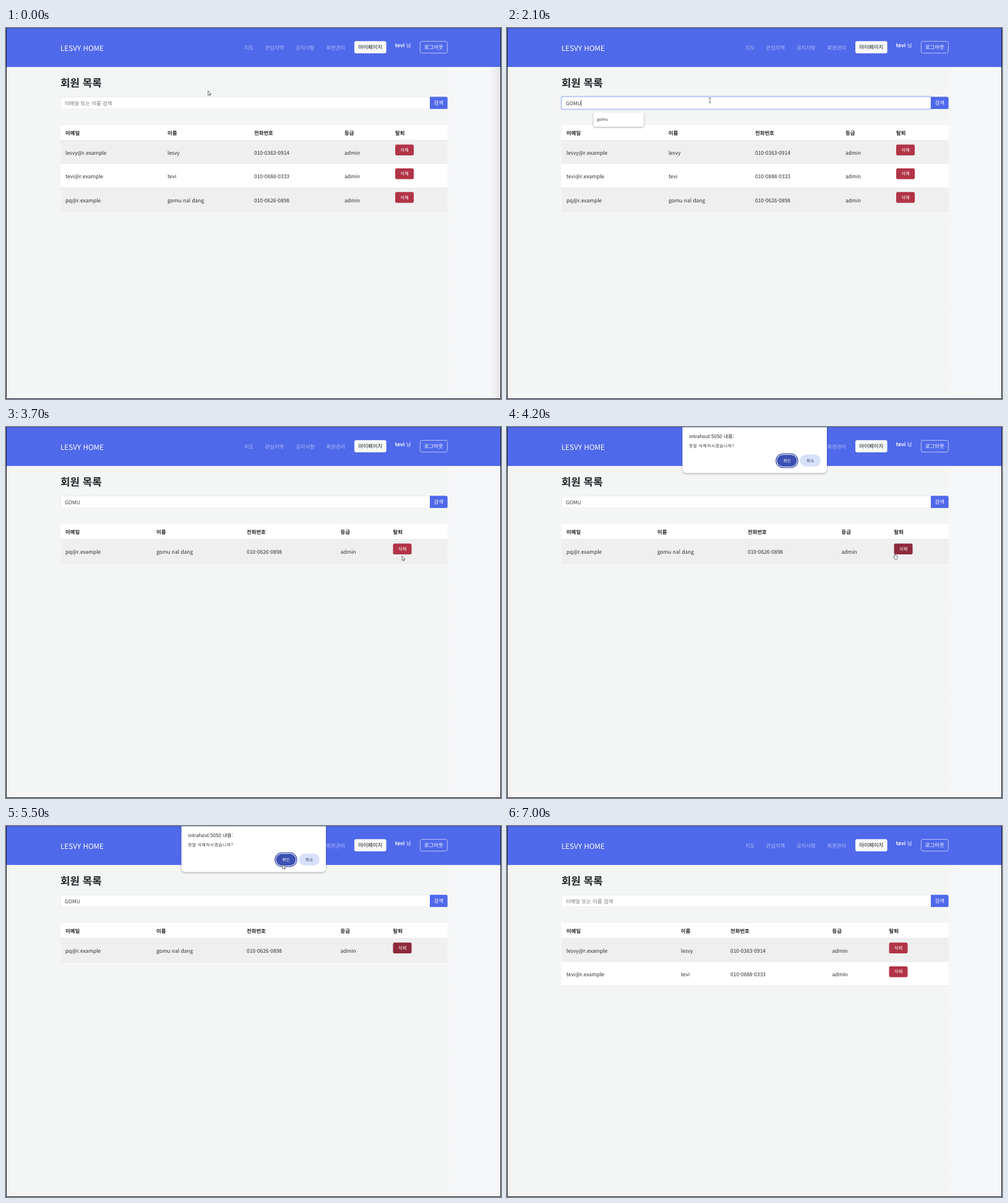
An HTML page for the animation above (7900 ms loop, 800x600 px).

```html
<!DOCTYPE html>
<html lang="ko">
<head>
<meta charset="utf-8">
<title>회원 목록</title>
<style>
html, body { margin: 0; width: 100%; height: 100%; overflow: hidden; background: #f4f6f5; }
svg { display: block; width: 100vw; height: 100vh; }
text {
  font-family: "Noto Sans CJK KR", "Noto Sans CJK", "Noto Sans", sans-serif;
  text-rendering: geometricPrecision;
  white-space: pre;
}
.float { filter: drop-shadow(0 1px 1.5px rgba(0, 0, 0, .35)); }
</style>
</head>
<body>
<svg id="stage" viewBox="0 0 800 600" xmlns="http://www.w3.org/2000/svg">
  <defs>
    <linearGradient id="side">
      <stop offset="0" stop-color="#f4f6f5"/>
      <stop offset=".15" stop-color="#f6f7f9"/>
      <stop offset="1" stop-color="#f6f7fa"/>
    </linearGradient>
    <linearGradient id="edge">
      <stop offset="0" stop-color="#e4e4e6" stop-opacity="0"/>
      <stop offset="1" stop-color="#e4e4e6"/>
    </linearGradient>
  </defs>
  <g id="page"></g>
  <g id="scene"></g>
  <path d="M.5 0V599.5H799.5V0" fill="none" stroke="#1c1c20"/>
  <path d="M0 .25H800" stroke="#30365c" stroke-width=".5"/>
</svg>
<script>
const LOOP = 7900, STEP = 100;
const BLUE = '#4f69eb', INK = '#2b2f34', RED = '#b13446', RED_DOWN = '#8e2a3a';
const $ = id => document.getElementById(id);

const rect = (x, y, w, h, fill, r = 0, extra = '') =>
  `<rect x="${x}" y="${y}" width="${w}" height="${h}" rx="${r}" fill="${fill}" ${extra}/>`;
const text = (x, y, str, size = 8.4, fill = INK, extra = '') =>
  `<text x="${x}" y="${y}" font-size="${size}" fill="${fill}" ${extra}>${str}</text>`;
const MID = 'text-anchor="middle"', BOLD = 'font-weight="700"';

const people = [
  ['lesvy@r.example', 'lesvy', '010-0363-0914'],
  ['tevi@r.example', 'tevi', '010-0888-0333'],
  ['pq@r.example', 'gomu nal dang', '010-0626-0898']
];
const heads = ['이메일', '이름', '전화번호', '등급', '탈퇴'];
const hints = ['안녕', 'aa', 'pq@r', 'gomu', 'pq@r.example'];

// Table contents over time: start, column positions, rows
const tables = [
  { at: 0, cols: [96, 261, 401, 547, 629], rows: people },
  { at: 2700, cols: [96, 243, 389, 540.5, 625.5], rows: people.slice(2) },
  { at: 6000, cols: [96, 281, 361, 525.5, 617.5], rows: people.slice(0, 2) }
];

// Pointer: time, x, y, shape from then on
const moves = [
  [0, 326.5, 101.5, 'arrow'], [300, 328, 117, 'beam'], [2100, 328, 117, 'beam'],
  [2400, 687, 119, 'hand'], [2900, 685, 124, 'hand'], [3200, 681, 140, 'arrow'],
  [3300, 679, 150, 'arrow'], [3700, 640, 208.5, 'arrow'], [3900, 637, 199, 'hand'],
  [4100, 636, 199, 'hand'], [4400, 592.5, 219, 'hand'], [4800, 560, 160, 'arrow'],
  [5300, 447, 62, 'arrow'], [6400, 447, 62, 'arrow'], [6900, 388, 16, 'arrow']
];
const keys = [1200, 1400, 1600, 1800];
const WORD = 'GOMU';

const shapes = {
  arrow: '<path d="M0 0V7.2L1.7 5.7L2.8 8.1L4 7.6L2.9 5.2H5Z" fill="#fff" stroke="#33363c" stroke-width=".7"/>',
  beam: '<path d="M-1.6-4H1.6M-1.6 4H1.6M0-4V4" fill="none" stroke="#50545a" stroke-width=".8"/>',
  hand: '<path d="M1.4 6V.9Q2.1-.1 2.8.9V3.6L4 3.8L5.2 4.1L6.3 4.6V7.4L5.3 9.4H2.1L-.3 6.2Q-.2 5 1.4 6Z" fill="#fff" stroke="#33363c" stroke-width=".7"/>'
};

function pointer(t) {
  if (t >= 7000) return '';
  let i = moves.length - 1;
  while (moves[i][0] > t) i--;
  const a = moves[i], b = moves[i + 1] || a;
  const u = b === a ? 0 : (t - a[0]) / (b[0] - a[0]);
  const e = u * u * (3 - 2 * u);
  const x = a[1] + (b[1] - a[1]) * e, y = a[2] + (b[2] - a[2]) * e;
  return `<g transform="translate(${x} ${y})">${shapes[a[3]]}</g>`;
}

function table(t) {
  const { cols, rows } = tables.filter(v => v.at <= t).pop();
  let out = rect(88, 157, 625.5, 24.8, '#fff');
  heads.forEach((h, i) => out += text(cols[i], 173, h, 8.4, '#212529', BOLD));
  rows.forEach((row, r) => {
    const y = 181.8 + r * 38.3;
    out += rect(88, y, 625.5, 38.3, r % 2 ? '#fff' : '#efeff0');
    out += rect(88, y + 38.1, 625.5, .6, '#dcdfe3');
    [...row, 'admin'].forEach((s, i) => out += text(cols[i], y + 23.1, s));
    const down = t >= 3900 && t < 6000;
    out += rect(cols[4], y + 6.8, 30, 17.5, down ? RED_DOWN : RED, 2.3);
    out += text(cols[4] + 15, y + 18.1, '삭제', 7.4, '#fff', MID);
  });
  return out + rect(88, 181.4, 625.5, .6, '#dcdfe3');
}

function search(t, typed) {
  const focus = t >= 300 && t < 2500;
  let out = focus
    ? rect(87.8, 110.8, 597.8, 20.6, '#fff', 3, 'stroke="#bac7f7" stroke-width="2"')
    : rect(88.3, 111.5, 597, 19.4, '#fff', 3, 'stroke="#dee2e6" stroke-width=".6"');
  out += '<path d="M685 111.2H711A2.6 2.6 0 0 1 713.6 113.8V128.4A2.6 2.6 0 0 1 711 131H685Z" fill="' + BLUE + '"/>';
  out += text(699.2, 124.4, '검색', 8.4, '#fff', MID);
  out += typed
    ? text(95, 124.7, typed, 8.4, '#3a3e43', 'id="typed"')
    : text(95, 124.7, '이메일 또는 이름 검색', 8.4, '#6f757b');
  const last = keys.filter(k => k <= t).pop() || 300;
  if (focus && (t - last) % 1000 < 550) out += '<path id="caret" d="M95.5 116V126.6" stroke="#333" stroke-width=".7"/>';
  return out;
}

function suggestions(t, typed) {
  if (t < 500 || t >= 2400) return '';
  const list = typed ? hints.slice(3, 4) : hints;
  const h = 4.4 + list.length * 18.8;
  let out = `<g class="float">${rect(139.5, 136.5, 81.5, h, '#fff', 3)}<path d="M146.5 137L150.5 133L154.5 137Z" fill="#fff"/></g>`;
  list.forEach((s, i) => out += text(145.2, 149.6 + i * 18.8, s, 6.6, '#33373c'));
  return out;
}

function dialog(t) {
  if (t < 4200 || t >= 5800) return '';
  return `<g class="float">${rect(283.5, -10, 233.5, 84.5, '#fff', 6)}</g>` +
    text(294, 18, 'intrahost:5050 내용:', 8, '#24272b') +
    text(294, 33.2, '정말 삭제하시겠습니까?', 6.8, '#33373c', 'letter-spacing=".45"') +
    rect(434.8, 43.4, 35.2, 22.2, '#fff', 11.1, 'stroke="#3549a5" stroke-width="1.3"') +
    rect(436.4, 45, 32, 19, '#3b50b2', 9.5) +
    text(452.6, 56.8, '확인', 6.7, '#fff', MID) +
    rect(473.5, 44.5, 33.3, 19.5, '#d7e1f9', 9.75) +
    text(490.2, 56.8, '취소', 6.7, '#2c3b69', MID);
}

function buildPage() {
  let out = rect(0, 0, 800, 600, '#f4f6f5') + rect(708, 63, 92, 537, 'url(#side)');
  out += rect(0, 0, 800, 63, BLUE) + text(88, 36.8, 'LESVY HOME', 11.7, '#fff');
  [[385, '지도'], [418.5, '관심지역'], [468, '공지사항'], [517.5, '회원관리']]
    .forEach(([x, s]) => out += text(x, 34.8, s, 8.4, '#b3bff5'));
  out += rect(563, 21.3, 51.6, 19.7, '#f8f9fa', 3) + text(588.8, 34.2, '마이페이지', 8.5, '#17191c', MID);
  out += text(628.8, 31.2, `<tspan ${BOLD}>tevi</tspan> 님`, 8.4, '#fff');
  out += rect(669.3, 21.6, 44, 19, 'none', 3, 'stroke="#e6eafc" stroke-width=".7"');
  out += text(691.3, 34.2, '로그아웃', 8.4, '#fff', MID);
  out += text(88, 95.4, '회원 목록', 16.9, '#212529', BOLD);
  $('page').innerHTML = out;
}

function draw(t) {
  const typed = t < 6000 ? WORD.slice(0, keys.filter(k => k <= t).length) : '';
  $('scene').innerHTML = (t < 100 ? rect(782, 63, 18, 537, 'url(#edge)') : '') +
    search(t, typed) + table(t) + suggestions(t, typed) + dialog(t) + pointer(t);
  if (typed && $('caret')) {
    const w = $('typed').getComputedTextLength();
    $('caret').setAttribute('transform', `translate(${w - .2} 0)`);
  }
}

let shown = -1;
const start = performance.now();
function tick() {
  const t = Math.floor((performance.now() - start) % LOOP / STEP) * STEP;
  if (t !== shown) draw(shown = t);
  requestAnimationFrame(tick);
}
buildPage();
tick();
</script>
</body>
</html>
```
